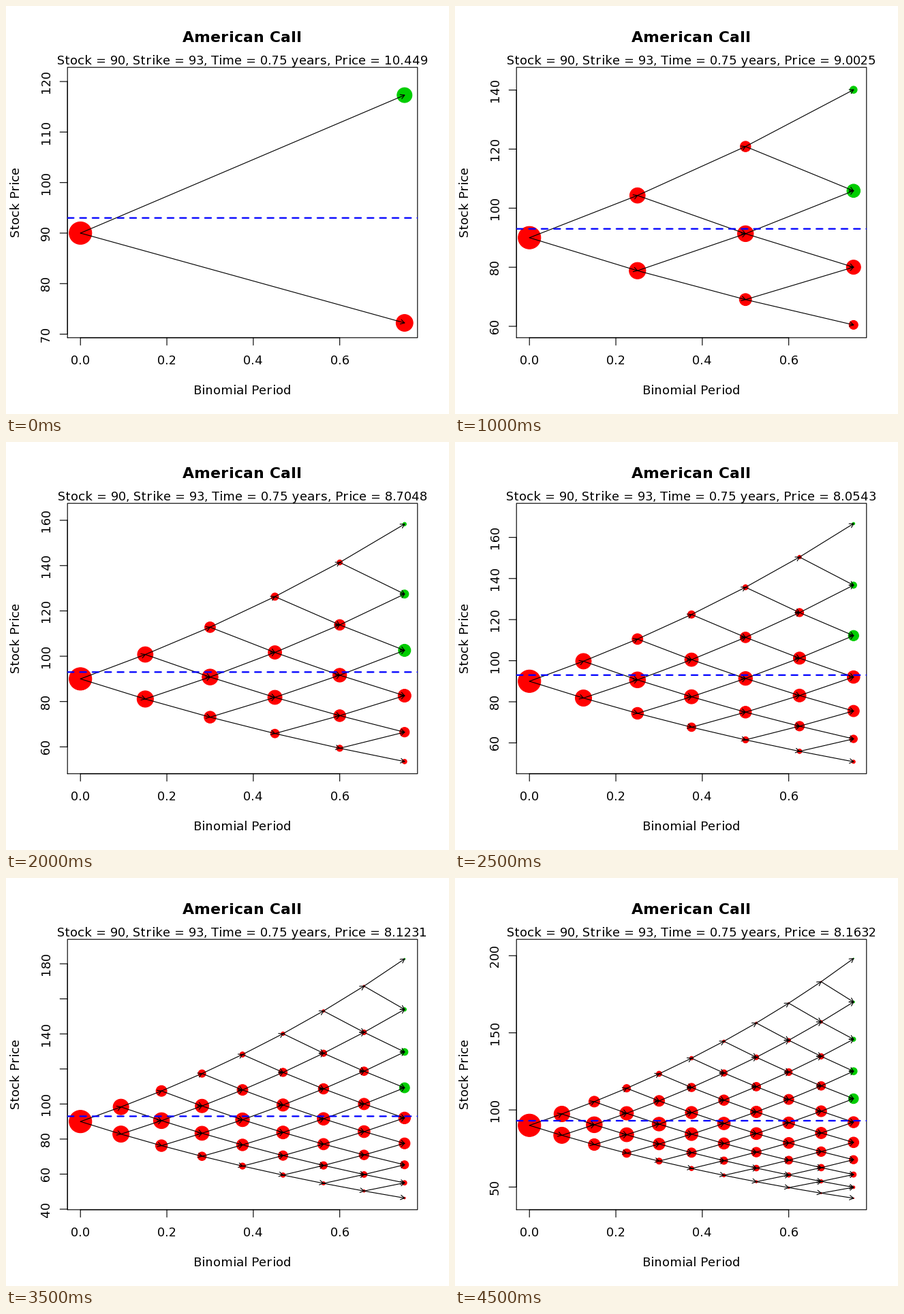
Recreate the animation shown at these times as a matplotlib script. Size 650 px wide and 600 px high, loop 5 s.

```python
import math

import matplotlib.pyplot as plt
from matplotlib.animation import FuncAnimation
from matplotlib.collections import LineCollection
from matplotlib.patches import Circle, Rectangle

# Option terms
SPOT, STRIKE, VOL, RATE, YEARS = 90, 93, 0.28, 0.03, 0.75
STEPS = 10

# Layout in pixels
W, H, DPI = 650, 600, 100
EM = 55 / 3
LINE = 1.2 * EM
PEN = 110 / 96
LEFT, RIGHT = 4.1 * LINE, W - 2.1 * LINE
TOP, BOTTOM = 4.1 * LINE, H - 5.1 * LINE
TICK = LINE / 2
HEAD = 6.6
ROOT_RADIUS = 16.5
PAD = 0.04

RED, GREEN, BLUE = "#ff0000", "#00cd00", "#0000ff"

plt.rcParams.update({
    "font.family": "DejaVu Sans",
    "text.hinting": "force_autohint",
    "text.hinting_factor": 1,
    "path.snap": False,
    "toolbar": "None",
})


def pt(px):
    return px * 72 / DPI


fig = plt.figure(figsize=(W / DPI, H / DPI), dpi=DPI, facecolor="white")
ax = fig.add_axes([0, 0, 1, 1])


def line(xs, ys):
    ax.plot(xs, ys, color="black", lw=pt(PEN),
            solid_capstyle="round", solid_joinstyle="round")


def label(x, y, text, size=EM, **style):
    ax.text(x, y, text, fontsize=pt(size), ha="center", va="baseline",
            rotation_mode="anchor", **style)


def build_tree(n):
    """Prices and probabilities per level, and the value of the call."""
    h = YEARS / n
    drift, jump = RATE * h, VOL * math.sqrt(h)
    p = 1 / (1 + math.exp(jump))
    prices = [[SPOT * math.exp(drift * t + jump * (2 * k - t))
               for k in range(t + 1)] for t in range(n + 1)]
    probs = [[math.comb(t, k) * p**k * (1 - p)**(t - k)
              for k in range(t + 1)] for t in range(n + 1)]
    value = [max(s - STRIKE, 0) for s in prices[n]]
    for t in range(n - 1, -1, -1):
        value = [max(prices[t][k] - STRIKE,
                     math.exp(-drift) * (p * value[k + 1] + (1 - p) * value[k]))
                 for k in range(t + 1)]
    return prices, probs, value[0]


def tick_step(span):
    """Round step that gives about five intervals."""
    cell = span / 5
    base = 10 ** math.floor(math.log10(cell))
    unit = base
    for factor, bias in ((2, 0.8), (5, 1.7), (10, 0.8)):
        if factor * base - cell >= bias * (cell - unit):
            break
        unit = factor * base
    return unit


def to_x(t):
    return LEFT + (t / YEARS + PAD) / (1 + 2 * PAD) * (RIGHT - LEFT)


def draw_x_axis():
    ticks = [0.0, 0.2, 0.4, 0.6]
    line([to_x(ticks[0]), to_x(ticks[-1])], [BOTTOM, BOTTOM])
    for t in ticks:
        line([to_x(t)] * 2, [BOTTOM, BOTTOM + TICK])
        label(to_x(t), BOTTOM + 1.8 * LINE, f"{t:.1f}")


def draw_y_axis(low, high, to_y):
    step = tick_step(high - low)
    ticks = [k * step for k in range(math.ceil(low / step),
                                     math.floor(high / step) + 1)]
    line([LEFT, LEFT], [to_y(ticks[0]), to_y(ticks[-1])])
    free = H
    for v in ticks:
        y = to_y(v)
        line([LEFT - TICK, LEFT], [y, y])
        half = 6 * len(str(v))
        # skip labels that would crowd the one below
        if y + half <= free:
            label(LEFT - 1.2 * LINE, y, str(v), rotation=90)
            free = y - half - 18


def arrow(x0, y0, x1, y1):
    back = math.atan2(y0 - y1, x0 - x1)
    a, b = [(x1 + HEAD * math.cos(back + turn), y1 + HEAD * math.sin(back + turn))
            for turn in (math.pi / 6, -math.pi / 6)]
    return [[(x0, y0), (x1, y1)], [a, (x1, y1), b]]


def draw(i):
    n = i + 1
    prices, probs, value = build_tree(n)
    y_min, y_max = prices[n][0] - 0.95, prices[n][n] * 1.03
    pad = PAD * (y_max - y_min)
    low, high = y_min - pad, y_max + pad

    def to_y(s):
        return BOTTOM - (s - low) / (high - low) * (BOTTOM - TOP)

    ax.clear()
    ax.set(xlim=(0, W), ylim=(H, 0))
    ax.axis("off")

    nodes = [[(to_x(t * YEARS / n), to_y(s)) for s in level]
             for t, level in enumerate(prices)]
    arrows = []
    for t in range(n + 1):
        for k, spot in enumerate(nodes[t]):
            color = GREEN if t == n and prices[t][k] > STRIKE else RED
            radius = max(0.5, ROOT_RADIUS * math.sqrt(probs[t][k]))
            ax.add_patch(Circle(spot, radius, fc=color, ec=color,
                                lw=pt(PEN), zorder=1))
            if t < n:
                arrows += arrow(*spot, *nodes[t + 1][k])
                arrows += arrow(*spot, *nodes[t + 1][k + 1])
    ax.add_collection(LineCollection(arrows, colors="black", linewidths=pt(PEN),
                                     capstyle="round", joinstyle="round",
                                     zorder=2))

    draw_x_axis()
    draw_y_axis(low, high, to_y)
    line([LEFT, RIGHT, RIGHT, LEFT, LEFT], [BOTTOM, BOTTOM, TOP, TOP, BOTTOM])

    y = to_y(STRIKE)
    strike, = ax.plot([LEFT, RIGHT], [y, y], color=BLUE, lw=pt(2 * PEN),
                      ls=(0, (4, 4)), dash_capstyle="round", zorder=3)
    strike.set_clip_path(Rectangle((LEFT, TOP), RIGHT - LEFT, BOTTOM - TOP,
                                   transform=ax.transData))

    mid_x, mid_y = (LEFT + RIGHT) / 2, (TOP + BOTTOM) / 2
    label(mid_x, TOP / 2 + 8, "American Call", 1.2 * EM, weight="bold")
    label(mid_x, TOP - 0.2 * LINE,
          f"Stock = {SPOT}, Strike = {STRIKE}, Time = {YEARS} years, "
          f"Price = {value:.5g}")
    label(mid_x, BOTTOM + 3.8 * LINE, "Binomial Period")
    label(LEFT - 3.2 * LINE, mid_y, "Stock Price", rotation=90)
    return []


anim = FuncAnimation(fig, draw, frames=STEPS, init_func=lambda: draw(0),
                     interval=500, repeat=True, repeat_delay=0)
plt.show()
```
